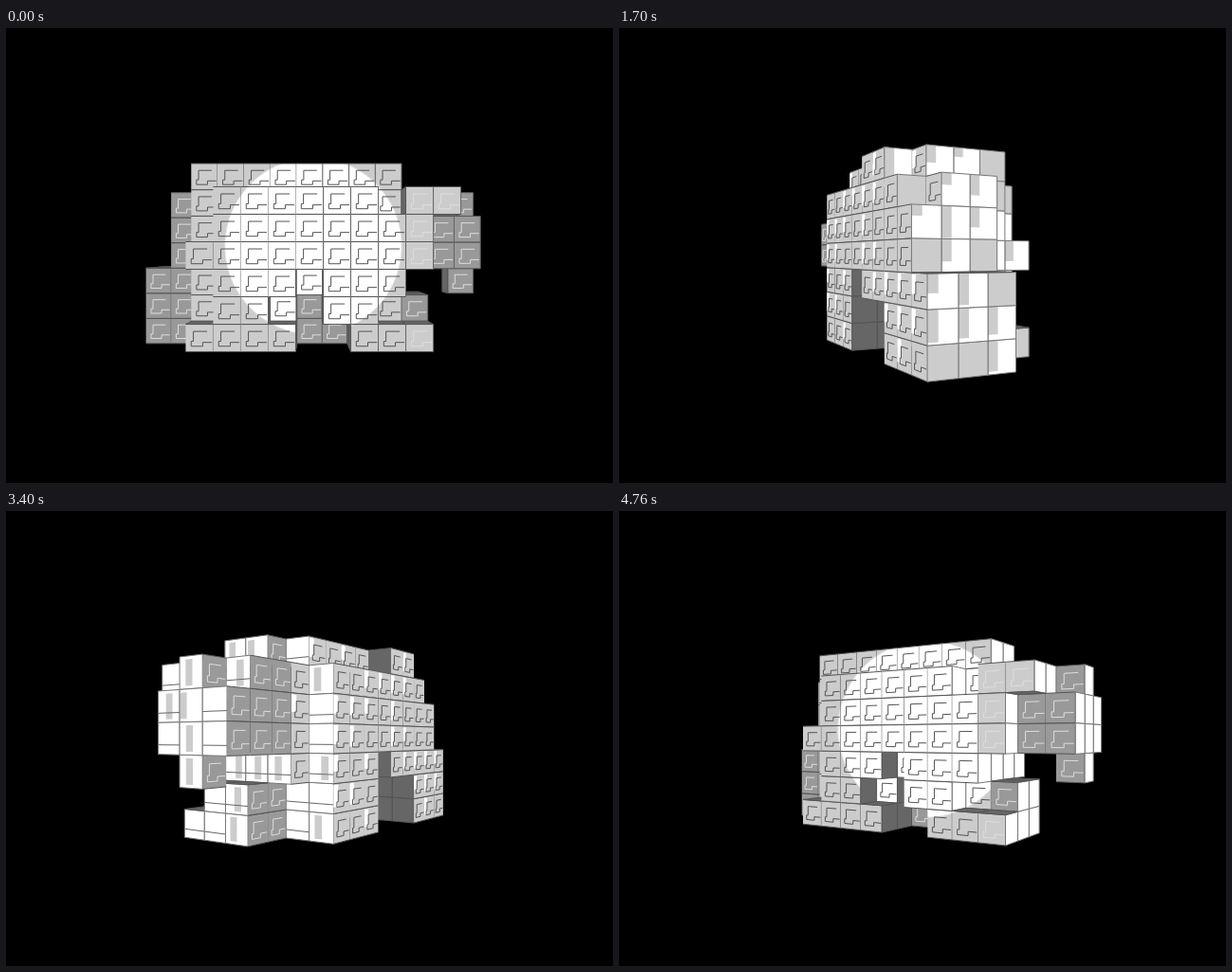
Write an HTML page with a canvas that moves like this. It is 640 px wide and 480 px high and loops after 5100 ms.

```html
<!DOCTYPE html>
<html>
<head>
<meta charset="utf-8">
<style>
html, body { margin: 0; height: 100%; background: #000; overflow: hidden; }
canvas { display: block; }
</style>
</head>
<body>
<canvas id="stage" width="640" height="480"></canvas>
<script>
const g = document.getElementById('stage').getContext('2d');
const FOCAL = 618, DIST = 23.3, PIVOT = -.1, TURN = 23.4;
const STEP = 340, STEPS = 15;
const WHITE = '#fff', LIGHT = '#ccc', MID = '#999', DARK = '#666', LINE = '#555';

const within = (v, a, b) => v >= a && v <= b;
const add = (p, q, k = 1) => p.map((a, i) => a + q[i] * k);
const cross = (p, q) => p.map((_, i) => {
  const j = (i + 1) % 3, k = (i + 2) % 3;
  return p[j] * q[k] - p[k] * q[j];
});

// The animal looks along +x and is five cells wide, around z = -1.
function body(x, y, z, w) {
  const flank = w == 2;
  if (y == 3) return flank ? z < 0 && within(x, -3, -2) : within(x, -4, z < -1 ? 2 : 3);
  if (y == -1 && flank && x == (z > 0 ? 0 : -1)) return false;
  const rear = Math.max(flank && y > 1 ? -4 : -5, z - 4) - (y == 0 && z > 0);
  return within(y, -1, 2) && within(x, rear, flank && (y > 1 || z < 0) ? 2 : 3);
}
function head(x, y, z, w) {
  if (w == 0 && x == 6) return within(y, -1, 2);
  const ear = z == 1 && (x == 4 || (x == 5 && y == 2));
  return within(x, 4, 6) && within(y, 0, x > 5 ? 1 : 2) && (w < 2 || ear);
}
function legs(x, y, z) {
  if (y >= 0) return false;
  if (z < 0 && (within(x, -6, -4) || within(x, 0, 2))) return true;
  if (y == -1 || z < -1) return false;
  const taper = y > -3 ? z : 0;
  const hind = z >= 0 && within(x, taper - 4, -1 - taper);
  return hind || (y > -3 ? within(x, 1, z > 0 ? 2 : 4) : within(x, 2, 4));
}
function solid([x, y, z]) {
  const w = Math.abs(z + 1);
  return w < 3 && y > -4 && (body(x, y, z, w) || head(x, y, z, w) || legs(x, y, z));
}

// Each side: name, outward normal n, its right u and down v vectors
const sides = ['front', 'nose', 'back', 'tail'].map((name, i) => {
  const s = [0, 1, 0, -1][i], c = [1, 0, -1, 0][i];
  return { name, n: [s, 0, c], u: [c, 0, -s] };
});
for (const y of [1, -1]) sides.push({ name: 'cap', n: [0, y, 0], u: [1, 0, 0] });
for (const s of sides) s.v = cross(s.u, s.n);

const faces = [];
for (let x = -6; x <= 6; x++)
  for (let y = -3; y <= 3; y++)
    for (let z = -3; z <= 1; z++) {
      const cell = [x, y, z], mid = [x, y, z + .5];
      if (!solid(cell)) continue;
      const hash = Math.sin(x * 12.9 + y * 78.2 + z * 37.7) * 4375.8;
      const rand = hash - Math.floor(hash);
      for (const { name, n, u, v } of sides)
        if (!solid(add(cell, n))) {
          const o = add(add(add(mid, n, .5), u, -.5), v, -.5);
          faces.push({ name, cell, mid, rand, o, n, u, v });
        }
    }

const HOOK = [[.78, .26], [.28, .26], [.28, .62], [.2, .62], [.2, .8], [.62, .8], [.62, .66], [.95, .66]];
const glow = g.createRadialGradient(324, 230, 0, 324, 230, 94);
glow.addColorStop(.98, WHITE);
glow.addColorStop(1, LIGHT);
let cos, sin, angle, eye;

function project([x, y, z]) {
  x -= PIVOT;
  const s = FOCAL / (DIST + x * sin - z * cos);
  return [320 + (PIVOT + x * cos + z * sin) * s, 240 - y * s];
}
function trace(f, pts) {
  g.beginPath();
  for (const [a, b] of pts) g.lineTo(...project(add(add(f.o, f.u, a), f.v, b)));
}
function line(f, color, ...pts) {
  trace(f, pts);
  g.strokeStyle = color;
  g.stroke();
}
function patch(f, x0, y0, x1, y1, color) {
  trace(f, [[x0, y0], [x1, y0], [x1, y1], [x0, y1]]);
  g.fillStyle = color;
  g.fill();
}
function shade({ name, cell: [x, , z] }) {
  if (name == 'front') {
    if (z == 1 || (z == 0 && x < 4)) return x < 4 ? glow : LIGHT;
    return cos < .5 ? DARK : MID;
  }
  if (name == 'back') return z == -3 || (x < 4 && z == -2) ? LIGHT : MID;
  if (name == 'tail') return x < -2 ? WHITE : DARK;
  if (name == 'nose') return x > 1 ? WHITE : DARK;
  return DARK;
}
function drawPlate(f, base) {
  const pale = base == MID || f.cell[0] > 3;
  if (f.name == 'back' && base == LIGHT && f.rand > .4)
    patch(f, 0, .05, .28, .4 + f.rand * .4, WHITE);
  line(f, pale ? '#ddd' : LINE, ...HOOK);
  line(f, LINE, [0, 0], [1, 0]);
  line(f, LINE, [0, 1], [1, 1]);
  if (f.name == 'front') line(f, DARK, [1, 0], [1, 1]);
}
function drawBrick(f, base) {
  const { name, rand } = f;
  if (base == WHITE && within(angle, 90, 300)) {
    if (name == 'tail') patch(f, 0, 0, rand < .3 ? 1 : .35, rand < .3 ? 1 : rand, LIGHT);
    else if (rand < .6) patch(f, rand, .1, rand + .3, .9, LIGHT);
    if (name == 'nose' && rand > .3) line(f, DARK, [0, .7], [1, .7]);
  }
  line(f, base == DARK ? LINE : '#777', [0, 0], [1, 0], [1, 1], [0, 1], [0, 0]);
}
function draw(step) {
  angle = TURN * step;
  cos = Math.cos(angle * Math.PI / 180);
  sin = Math.sin(angle * Math.PI / 180);
  eye = [PIVOT - DIST * sin, 0, DIST * cos];
  g.fillStyle = '#000';
  g.fillRect(0, 0, 640, 480);
  for (const f of faces) f.far = Math.hypot(...add(eye, f.mid, -1));
  faces.sort((a, b) => b.far - a.far);
  for (const f of faces) {
    const toEye = add(eye, f.o, -1);
    if (f.n.reduce((sum, a, i) => sum + a * toEye[i], 0) <= 0) continue;
    const base = shade(f);
    patch(f, 0, 0, 1, 1, base);
    (f.name == 'front' || f.name == 'back' ? drawPlate : drawBrick)(f, base);
  }
}
let shown = -1;
function tick() {
  const step = Math.floor(performance.now() / STEP) % STEPS;
  if (step != shown) draw(shown = step);
  requestAnimationFrame(tick);
}
tick();
</script>
</body>
</html>
```
